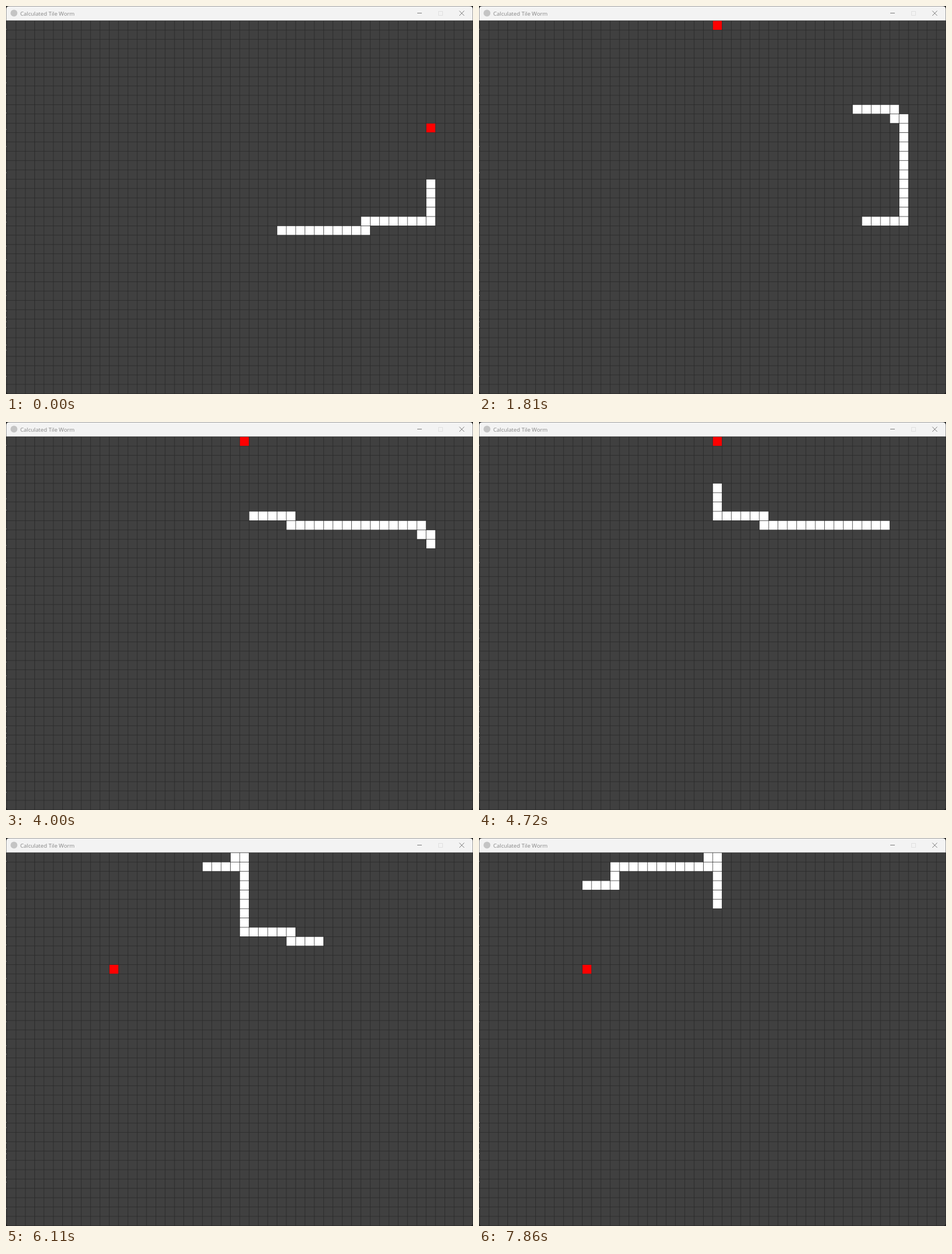
Animation, 821 px wide and 682 px high, one loop 8000 ms. Source, as an HTML page with a canvas:

```html
<!DOCTYPE html>
<html lang="en">
<head>
<meta charset="utf-8">
<title>Calculated Tile Worm</title>
<style>
html, body { margin: 0; width: 100%; height: 100%; overflow: hidden; background: #1e1e1e; }
canvas { display: block; }
</style>
</head>
<body>
<canvas id="stage" width="821" height="682"></canvas>
<script>
const ctx = document.getElementById('stage').getContext('2d');
const W = 821, H = 682, LOOP = 8000;
const COLS = 50, ROWS = 40;
const PITCH = 16.387, LINE = 0.82;     // cell spacing and grid line width
const STEP_MS = 146, LEAD_MS = 95;     // the first step comes early by LEAD_MS

const ORIGIN = [29, 22];
const MOVES = '9R 1U 7R 11U 1L 1U 14L 1U 5L 8U 1L 1D 10L 2D 3L';
const DIRS = { R: [1, 0], L: [-1, 0], U: [0, -1], D: [0, 1] };
const LENGTH = 22;
const MEALS = [6, 37];                 // steps at which food is eaten
const LAST_FOOD = [11, 12];

const colX = c => 1.64 + c * PITCH;
const rowY = r => 26.3 + r * PITCH;

function buildRoute() {
  const route = [ORIGIN];
  for (const move of MOVES.split(' ')) {
    const [dx, dy] = DIRS[move.slice(-1)];
    for (let n = parseInt(move); n > 0; n--) {
      const [x, y] = route[route.length - 1];
      route.push([x + dx, y + dy]);
    }
  }
  return route;
}

const route = buildRoute();
const lastStep = route.length - LENGTH;
const headAt = step => LENGTH - 1 + step;
const foods = [...MEALS.map(m => route[headAt(m)]), LAST_FOOD];

function rect(color, x, y, w, h) {
  ctx.fillStyle = color;
  ctx.fillRect(x, y, w, h);
}

function cell([c, r], color) {
  rect(color, colX(c), rowY(r), PITCH - LINE, PITCH - LINE);
}

function stroke(color, ...points) {
  ctx.strokeStyle = color;
  ctx.beginPath();
  points.forEach(([x, y]) => ctx.lineTo(x, y));
  ctx.stroke();
}

function drawTitleBar() {
  rect('#f3f3f3', 0.4, 0.4, W - 0.8, rowY(0) - LINE - 0.4);

  ctx.fillStyle = '#c4c4c4';
  ctx.beginPath();
  ctx.arc(14, 12.5, 6, 0, Math.PI * 2);
  ctx.fill();

  ctx.fillStyle = '#858585';
  ctx.font = '9.7px "Open Sans", "Noto Sans", sans-serif';
  ctx.fillText('Calculated Tile Worm', 25, 16.5);

  stroke('#777', [723, 12.5], [731, 12.5]);
  stroke('#777', [797, 8.5], [805.5, 17]);
  stroke('#777', [805.5, 8.5], [797, 17]);
  ctx.strokeStyle = '#e0e0e0';
  ctx.strokeRect(760.5, 9.5, 7, 7);
}

function drawGrid() {
  const top = rowY(0) - LINE;
  rect('#404040', 0, top, W, H - top);
  for (let c = 0; c <= COLS; c++) rect('#2a2a2a', colX(c) - LINE, top, LINE, H - top);
  for (let r = 0; r <= ROWS; r++) rect('#2a2a2a', 0, rowY(r) - LINE, W, LINE);
}

// Specks of the desktop behind the window's left edge
function drawSpecks() {
  let seed = 7;
  for (let y = 40; y < H - 20; y += 8 + seed % 40) {
    seed = (seed * 75 + 74) % 65537;
    rect('#777', 0, y, 1, 2);
  }
}

function drawSnake(step) {
  const eaten = MEALS.filter(m => m < step).length;
  const eating = MEALS.includes(step);
  // The tail waits one step wherever it passes an eaten meal
  const tail = step - MEALS.filter(m => headAt(m) < step).length;
  // While eating, the head and food are hidden
  const head = headAt(step) - (eating ? 1 : 0);
  if (!eating) cell(foods[eaten], '#f00');
  for (let i = tail; i <= head; i++) cell(route[i], '#fff');
}

function draw(t) {
  rect('#1e1e1e', 0, 0, W, H);
  ctx.save();
  ctx.beginPath();
  ctx.roundRect(0, 0, W, H, 6);
  ctx.clip();
  drawGrid();
  drawTitleBar();
  drawSpecks();
  drawSnake(Math.min(lastStep, Math.floor((t + LEAD_MS) / STEP_MS)));
  ctx.restore();
}

const start = performance.now();
function tick() {
  draw((performance.now() - start) % LOOP);
  requestAnimationFrame(tick);
}
tick();
</script>
</body>
</html>
```
